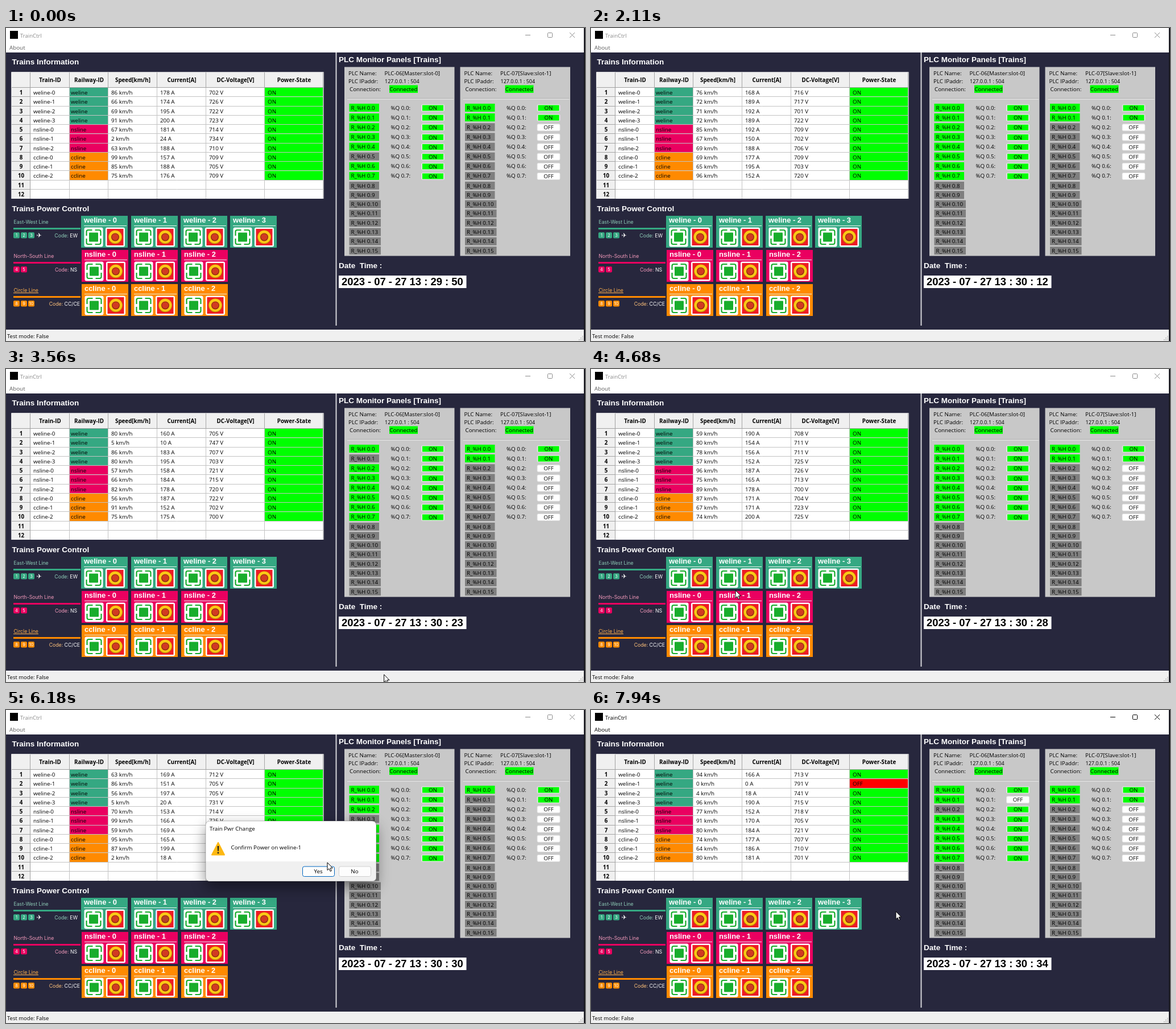
An HTML page with a canvas for the animation above (8 s loop, 1018x550 px).

```html
<!DOCTYPE html>
<html lang="en">
<head>
<meta charset="utf-8">
<title>TrainCtrl</title>
<style>
html, body { margin: 0; width: 100%; height: 100%; overflow: hidden; background: #27273d; }
canvas { display: block; }
</style>
</head>
<body>
<canvas id="stage" width="1018" height="550"></canvas>
<script>
const ctx = document.getElementById('stage').getContext('2d');
const LOOP = 8000;
const UI = '"Open Sans", "Noto Sans", sans-serif';
const ARIAL = '"Liberation Sans", Arial, sans-serif';
const GEO = 'Inter, sans-serif';
const GREEN = '#00ff00', NAVY = '#27273d';
const LINES = [
  { id: 'weline', name: 'East-West Line', code: 'EW', stops: [1, 2, 3], count: 4, color: '#35a882', tint: '#8fcdb8', end: 126 },
  { id: 'nsline', name: 'North-South Line', code: 'NS', stops: [4, 5], count: 3, color: '#ea0060', tint: '#f39abb', end: 125 },
  { id: 'ccline', name: 'Circle Line', code: 'CC/CE', stops: [8, 9, 10], count: 3, color: '#ff8a00', tint: '#ffc27a', end: 130 }
];
const TRAINS = LINES.flatMap(line =>
  Array.from({ length: line.count }, (_, n) => ({ line, name: `${line.id}-${n}` })));

// Readings refresh every two clock seconds. Trains braking at certain refreshes:
const BRAKING = { 0: [5], 11: [], 16: [1], 19: [], 20: [3, 9], 21: [2, 3, 9], 22: [2] };
const POWER_OFF = 22, CUT_TRAIN = 1;

// [ms, clock seconds since 13:29:50]
const CLOCK = [[0, 0], [2100, 22], [3550, 33], [4670, 38], [7850, 44], [8000, 44.3]];
// [ms, x, y]
const POINTER = [
  [[420, 137, 27], [840, 137, 27], [1840, 330, 552]],
  [[2690, 640, 552], [3000, 665, 537], [3560, 665, 537], [4680, 254, 389], [5000, 283, 370],
    [5600, 283, 370], [6120, 565, 268], [6880, 565, 268], [7010, 551, 294], [7940, 536, 354], [8000, 536, 354]]
];
const CLICK = 5250, DIALOG_OPEN = 5500, DIALOG_CLOSE = 6920;

function along(path, t) {
  const i = path.findIndex((p, n) => n && t <= p[0]);
  if (i < 0 || t < path[0][0]) return null;
  const a = path[i - 1], b = path[i], u = (t - a[0]) / (b[0] - a[0]);
  return a.slice(1).map((v, n) => v + (b[n + 1] - v) * u);
}

function random(seed) {
  const v = Math.sin(seed * 127.1 + 11.7) * 43758.5453;
  return v - Math.floor(v);
}

function reading(k, i) {
  if (k >= POWER_OFF && i === CUT_TRAIN) return { speed: 0, amps: 0, volts: 791, on: false };
  const pick = (n, lo, hi) => lo + Math.floor(random(k * 40 + i * 4 + n) * (hi - lo + 1));
  const braking = (BRAKING[k] ?? [Math.floor(random(k) * 16)]).includes(i);
  return braking
    ? { speed: pick(1, 0, 5), amps: pick(2, 10, 28), volts: pick(3, 730, 749), on: true }
    : { speed: pick(1, 56, 99), amps: pick(2, 150, 200), volts: pick(3, 700, 730), on: true };
}

function rect(x, y, w, h, fill) {
  ctx.fillStyle = fill;
  ctx.fillRect(x, y, w, h);
}
function round(x, y, w, h, r, fill, stroke) {
  ctx.beginPath();
  ctx.roundRect(x, y, w, h, r);
  if (fill) { ctx.fillStyle = fill; ctx.fill(); }
  if (stroke) { ctx.strokeStyle = stroke; ctx.stroke(); }
}
function disc(x, y, r, fill) {
  ctx.beginPath();
  ctx.arc(x, y, r, 0, 7);
  ctx.fillStyle = fill;
  ctx.fill();
}
function polygon(points, fill) {
  ctx.beginPath();
  points.forEach(([x, y]) => ctx.lineTo(x, y));
  ctx.closePath();
  ctx.fillStyle = fill;
  ctx.fill();
}
function stroke(color, ...paths) {
  ctx.beginPath();
  for (const [a, b, c, d] of paths) { ctx.moveTo(a, b); ctx.lineTo(c, d); }
  ctx.strokeStyle = color;
  ctx.stroke();
}
function text(s, x, y, color = '#000', font = '9.8px ' + UI, align = 'left') {
  ctx.font = font;
  ctx.textAlign = align;
  ctx.fillStyle = color;
  ctx.fillText(s, x, y);
}
const centred = (s, x, y, weight = '') => text(s, x, y, '#000', weight + ' 9.8px ' + UI, 'center');
const heading = (s, x, y) => text(s, x, y, '#fff', 'bold 13.5px ' + ARIAL);

function drawWindow(active) {
  const ink = active ? '#000' : '#8a8a8a';
  rect(0, 0, 1018, 550, NAVY);
  rect(0, 0, 1018, 43, '#fff');
  rect(7, 5, 14, 14, '#000');
  text('TrainCtrl', 25, 16.5, ink, '9.5px ' + UI);
  text('About', 6, 38, active ? '#000' : '#5c5c5c');
  stroke(ink, [913, 12.5, 922, 12.5], [991, 8, 1000, 17], [1000, 8, 991, 17]);
  round(952.5, 8.5, 8, 8, 1, null, ink);
  rect(0, 530, 1018, 20, '#f0f0f0');
  text('Test mode: False', 2, 545, '#000', '9.5px ' + UI);
  for (let i = 0; i < 3; i++)
    for (let j = 0; j <= i; j++) rect(1013 - j * 3, 541 + i * 3, 1.6, 1.6, '#b0b0b0');
  rect(1016, 0, 2, 550, '#15151d');
  rect(579.5, 43, 2, 480, '#d6d6da');
  heading('Trains Information', 10.5, 64);
  heading('Trains Power Control', 10.5, 321.5);
  heading('PLC Monitor Panels [Trains]', 585, 59.5);
  heading('Date  Time :', 585, 421.5);
}

function drawTable(data) {
  const cols = [10, 43, 112, 180, 266, 352, 455, 558];
  const heads = ['Train-ID', 'Railway-ID', 'Speed[km/h]', 'Current[A]', 'DC-Voltage[V]', 'Power-State'];
  const top = i => 105 + i * 16.25;
  rect(9.5, 77.5, 549, 222.5, '#fff');
  rect(9.5, 77.5, 549, 27.5, '#f0f0f0');
  rect(9.5, 77.5, 33.5, 222.5, '#f0f0f0');
  heads.forEach((h, i) => centred(h, (cols[i + 1] + cols[i + 2]) / 2, 94.5, 'bold'));
  data.forEach((d, i) => {
    rect(112, top(i), 68, 16.25, TRAINS[i].line.color);
    rect(455, top(i), 103, 16.25, d.on ? GREEN : '#f00');
  });
  for (let i = 0; i < 12; i++) {
    const y = Math.round(top(i)) - .5;
    stroke('#c3c3c3', [43, y, 558, y]);
    stroke('#a5a5a5', [10, y, 43, y]);
    centred(i + 1, 26.5, top(i) + 12, 'bold');
  }
  for (const x of cols.slice(1)) {
    stroke('#c3c3c3', [x - .5, 105, x - .5, 300]);
    stroke('#a5a5a5', [x - .5, 78, x - .5, 105]);
  }
  stroke('#a0a0a0', [10, 104.5, 558, 104.5], [42.5, 78, 42.5, 300]);
  data.forEach((d, i) => {
    const row = [TRAINS[i].name, TRAINS[i].line.id, d.speed + ' km/h', d.amps + ' A', d.volts + ' V', d.on ? 'ON' : 'OFF'];
    row.forEach((s, c) => text(s, cols[c + 1] + (c === 1 ? 2 : 5), top(i) + 12));
  });
}

function drawLegend(line, y) {
  const { tint, color, end } = line, font = '8.7px ' + GEO;
  const circle = line.id === 'ccline';
  text(line.name, 13.5, y + 13.5, circle ? '#ffb04d' : tint, font);
  if (circle) stroke('#ffb04d', [13, y + 15.5, 57, y + 15.5]);
  rect(13, y + 21, 118, 3, color);
  line.stops.forEach((n, i) => {
    round(13 + i * 13, y + 29, 11, 10.5, 2, color);
    text(n, 18.5 + i * 13, y + 37, '#fff', '7.5px ' + GEO, 'center');
  });
  if (line.id === 'weline') text('✈', 53.5, y + 38, '#fff', '11px "DejaVu Sans", sans-serif');
  text(line.code, end, y + 37.5, '#fff', font, 'right');
  text('Code: ', end - ctx.measureText(line.code).width, y + 37.5, tint, font, 'right');
}

function drawStart(x, y) {
  const green = '#18ad2c';
  round(x - 16.5, y - 17, 33, 34, 3, '#fff');
  ctx.lineWidth = 2.2;
  round(x - 12.5, y - 12.5, 25, 25, 3, null, green);
  ctx.lineWidth = 1;
  rect(x - 2.5, y - 14, 5, 28, '#fff');
  rect(x - 14, y - 2.5, 28, 5, '#fff');
  round(x - 8, y - 8, 16, 16, 1, green);
}

function drawStop(x, y, focused) {
  round(x - 17, y - 17, 34, 34, 3, '#fff', focused ? '#5b9be0' : null);
  rect(x - 14.5, y - 14.5, 29, 29, '#ee1c24');
  disc(x, y, 12, '#b98a08');
  disc(x, y - .5, 11.3, '#fbc916');
  disc(x, y, 7, '#8f2a10');
  disc(x, y - .3, 5.8, focused ? '#b5402c' : '#d23a22');
}

function drawCard(line, n, x, y, focused) {
  rect(x, y, 82, 56, line.color);
  text(`${line.id} - ${n}`, x + 5, y + 12, '#fff', 'bold 12.9px ' + ARIAL);
  rect(x + 5, y + 17, 75, 1, '#e8f3ee');
  drawStart(x + 22, y + 37.5);
  drawStop(x + 60, y + 37.5, focused);
}

function drawControls(focused) {
  LINES.forEach((line, i) => {
    const y = 330 + i * 60;
    drawLegend(line, y);
    for (let n = 0; n < line.count; n++)
      drawCard(line, n, Math.round((i ? 132.8 : 132.2) + n * 87.4), y, focused && !i && n === CUT_TRAIN);
  });
}

function drawPlc(x, name, registers, coils) {
  rect(x, 68.5, 193.5, 332, '#c8c8c8');
  text('PLC Name:', x + 7, 83);
  text(name, x + 70.5, 83);
  text('PLC IPaddr:', x + 7, 97);
  text('127.0.0.1 : 504', x + 71, 97, '#000', '9px ' + UI);
  text('Connection:', x + 9, 110.5);
  rect(x + 79, 100.5, 50, 13.5, GREEN);
  text('Connected', x + 79.3, 110.5);
  rect(x + 5, 123.5, 187, 1, '#a5a5a5');
  rect(x + 5, 124.5, 187, 1, '#f4f4f4');
  for (let i = 0; i < 16; i++) {
    const y = i < 8 ? 140 + i * 17.14 : 277 + (i - 8) * 16.3;
    rect(x + 8.5, y - 7, i < 10 ? 52.5 : 55.5, 14, registers[i] ? GREEN : '#7f7f7f');
    text('R_%H 0.' + i, x + 11.5, y + 3.5);
    if (i > 7) continue;
    text(`%Q 0.${i}:`, x + 81.5, y + 3.5);
    round(x + 135.5, y - 5.5, 40, 12, 2, coils[i] ? '#e8e8e8' : '#fff', '#dedede');
    if (coils[i]) rect(x + 137, y - 4.5, 37, 10, GREEN);
    centred(coils[i] ? 'ON' : 'OFF', x + 155.5, y + 4.2);
  }
}

function drawClock(sec) {
  const s = 50 + sec, pad = n => String(n).padStart(2, '0');
  rect(585, 435, 224.5, 22, '#fff');
  text(`2023 - 07 - 27 13 : ${29 + Math.floor(s / 60)} : ${pad(s % 60)}`, 590, 451.5, '#000', 'bold 18.4px ' + ARIAL);
}

function drawDialog(alpha) {
  ctx.save();
  ctx.globalAlpha = alpha;
  ctx.shadowColor = 'rgba(0,0,0,.45)';
  ctx.shadowBlur = 24;
  ctx.shadowOffsetY = 10;
  round(351, 195, 300, 106, 7, '#fff');
  ctx.shadowColor = 'transparent';
  round(351, 266, 300, 35, [0, 0, 7, 7], '#f0f0f0');
  round(351, 195, 300, 106, 7, null, 'rgba(0,0,0,.25)');
  text('Train Pwr Change', 358, 211.5);
  text('Confirm Power on weline-1', 395.5, 244.5);
  ctx.lineJoin = 'round';
  polygon([[373, 233], [384, 254.5], [362, 254.5]], '#fdb813');
  ctx.lineWidth = 2;
  ctx.strokeStyle = '#fdb813';
  ctx.stroke();
  ctx.lineWidth = 1;
  polygon([[371.6, 239], [374.4, 239], [373.8, 248], [372.2, 248]], '#222');
  disc(373, 251, 1.4, '#222');
  round(521.5, 275, 56, 17.5, 3, '#fdfdfd', '#0067c0');
  round(585.5, 275, 56, 17.5, 3, '#fdfdfd', '#d0d0d0');
  centred('Yes', 549, 287);
  centred('No', 613, 287);
  ctx.restore();
}

function drawPointer(t) {
  const spot = POINTER.map(path => along(path, t)).find(Boolean);
  if (!spot) return;
  ctx.save();
  ctx.translate(...spot);
  polygon([[0, 0], [0, 13.5], [3, 10.8], [5.2, 15.5], [7.3, 14.5], [5.2, 9.9], [9.3, 9.7]], '#fff');
  ctx.strokeStyle = '#000';
  ctx.stroke();
  ctx.restore();
}

function draw(t) {
  const sec = Math.floor(along(CLOCK, t)[0]);
  const data = TRAINS.map((_, i) => reading(Math.floor(sec / 2), i));
  const dialog = t >= DIALOG_OPEN && t < DIALOG_CLOSE;
  const running = data.map(d => d.speed >= 10 || !d.on);
  const power = data.map(d => d.on);
  drawWindow(t >= CLICK && !dialog);
  drawTable(data);
  drawControls(t >= CLICK);
  drawPlc(595, 'PLC-06[Master:slot-0]', running.slice(0, 8), power.slice(0, 8));
  drawPlc(798.5, 'PLC-07[Slave:slot-1]', running.slice(8), power.slice(8));
  drawClock(sec);
  if (dialog) drawDialog(Math.min(1, .4 + (t - DIALOG_OPEN) / 150));
  drawPointer(t);
}

const start = performance.now();
function tick() {
  draw((performance.now() - start) % LOOP);
  requestAnimationFrame(tick);
}
tick();
</script>
</body>
</html>
```
